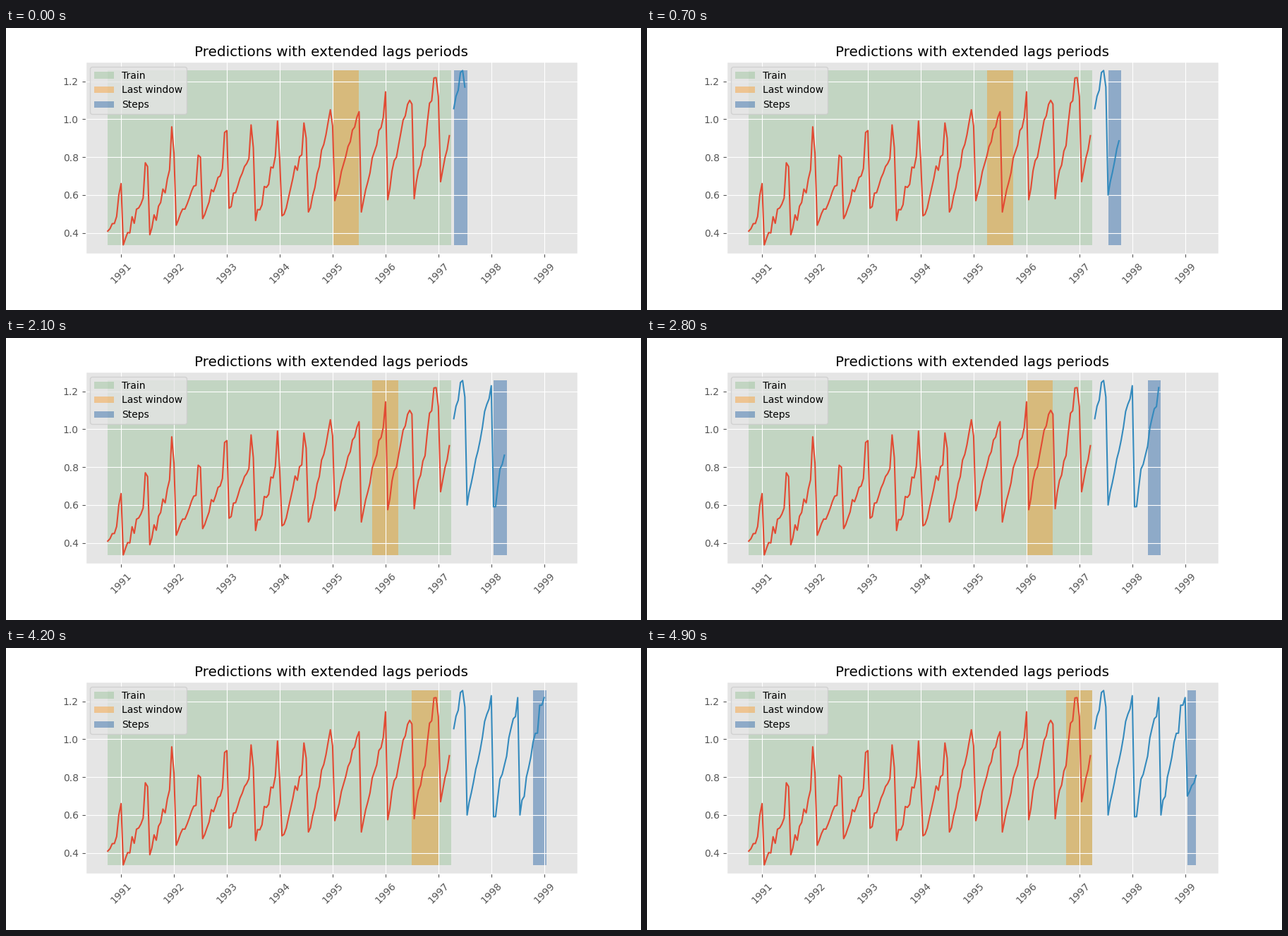
Recreate the animation shown at these times as a matplotlib script. Size 900 px wide and 400 px high, loop 5600 ms.

```python
import numpy as np
import matplotlib.pyplot as plt
from matplotlib.animation import FuncAnimation
from matplotlib.patches import Rectangle

# Each year drops from January to a February low, then climbs to December
JAN = [0.60, 0.66, 0.75, 0.82, 0.80, 0.94, 0.85, 0.78, 0.90,
       0.965, 1.04, 1.145, 1.08, 1.12, 1.17, 1.23, 1.22, 1.22]
FEB = [0.315, 0.33622, 0.39, 0.44, 0.475, 0.53, 0.465, 0.49, 0.51,
       0.57, 0.51, 0.575, 0.58, 0.67, 0.60, 0.59, 0.60, 0.70]
DEC = [0.60, 0.77, 0.96, 0.81, 0.93, 0.97, 0.99, 0.98, 1.05,
       1.01, 1.01, 1.10, 1.22, 1.25724, 1.16, 1.12, 1.18, 0.95]
FIRST_YEAR = 1991
N_TRAIN, START, LAST = 156, 157, 203
STEPS, WINDOW, WINDOW_START = 6, 12, 102
FOLDS = 8


def monthly_values():
    """Values from July of the first year to June of the last."""
    rng = np.random.default_rng(4)
    jan, feb, dec = (np.array(v)[:, None] for v in (JAN, FEB, DEC))
    year = FIRST_YEAR + np.arange(len(JAN))[:, None]
    slope = 0.86 + 0.2 * np.tanh(year - 1998.6)   # later years climb sooner
    rise = slope * np.linspace(0, 1, 11)
    rise += rng.normal(0, 0.035, rise.shape)
    rise[:, 0], rise[:, -1] = 0, 1
    climb = feb + (dec - feb) * rise.clip(0, 1)
    return np.hstack([jan, climb]).ravel()[6:-6]


values = monthly_values()
low, high = values.min(), values.max()
months = np.arange("1991-07", "2008-07", dtype="datetime64[M]")
days = (months.astype("datetime64[D]") - np.datetime64("1991-07-01")).astype(int)

plt.style.use("ggplot")
plt.rcParams["font.family"] = "DejaVu Sans"
fig, ax = plt.subplots(figsize=(9, 4), dpi=100)
fig.subplots_adjust(left=0.125, right=0.9, bottom=0.2, top=0.88)


def place(rect, start, end):
    end = min(end, LAST)
    rect.set_x(days[start])
    rect.set_width(days[end] - days[start])


def band(start, end, color, alpha, label):
    rect = Rectangle((0, low), 0, high - low, facecolor=color,
                     alpha=alpha, linewidth=0, zorder=0, label=label)
    place(rect, start, end)
    return ax.add_patch(rect)


band(0, N_TRAIN, "green", 0.15, "Train")
window = band(WINDOW_START, WINDOW_START + WINDOW, "darkorange", 0.36, "Last window")
steps = band(START, START + STEPS, "#0c529d", 0.4, "Steps")

ax.plot(days[:N_TRAIN], values[:N_TRAIN], color="#E24A33")
forecast, = ax.plot([], [], color="#348ABD")

pad_x, pad_y = 0.05 * days[LAST], 0.05 * (high - low)
ax.set_xlim(-pad_x, days[LAST] + pad_x)
ax.set_ylim(low - pad_y, high + pad_y)
ax.set_xticks(days[6::24], [str(FIRST_YEAR + i) for i in range(9)], rotation=45)
ax.set_yticks([0.4, 0.6, 0.8, 1.0, 1.2])
ax.set_title("Predictions with extended lags periods")
ax.legend(loc="upper left").get_frame().set_linewidth(1)


def update(fold):
    shift = STEPS * fold
    first = START + shift
    place(window, WINDOW_START + shift, WINDOW_START + shift + WINDOW)
    place(steps, first, first + STEPS)
    shown = slice(START, first + STEPS)
    forecast.set_data(days[shown], values[shown])
    return window, steps, forecast


anim = FuncAnimation(fig, update, frames=FOLDS, interval=700,
                     repeat=True, repeat_delay=0, blit=False)
plt.show()
```
